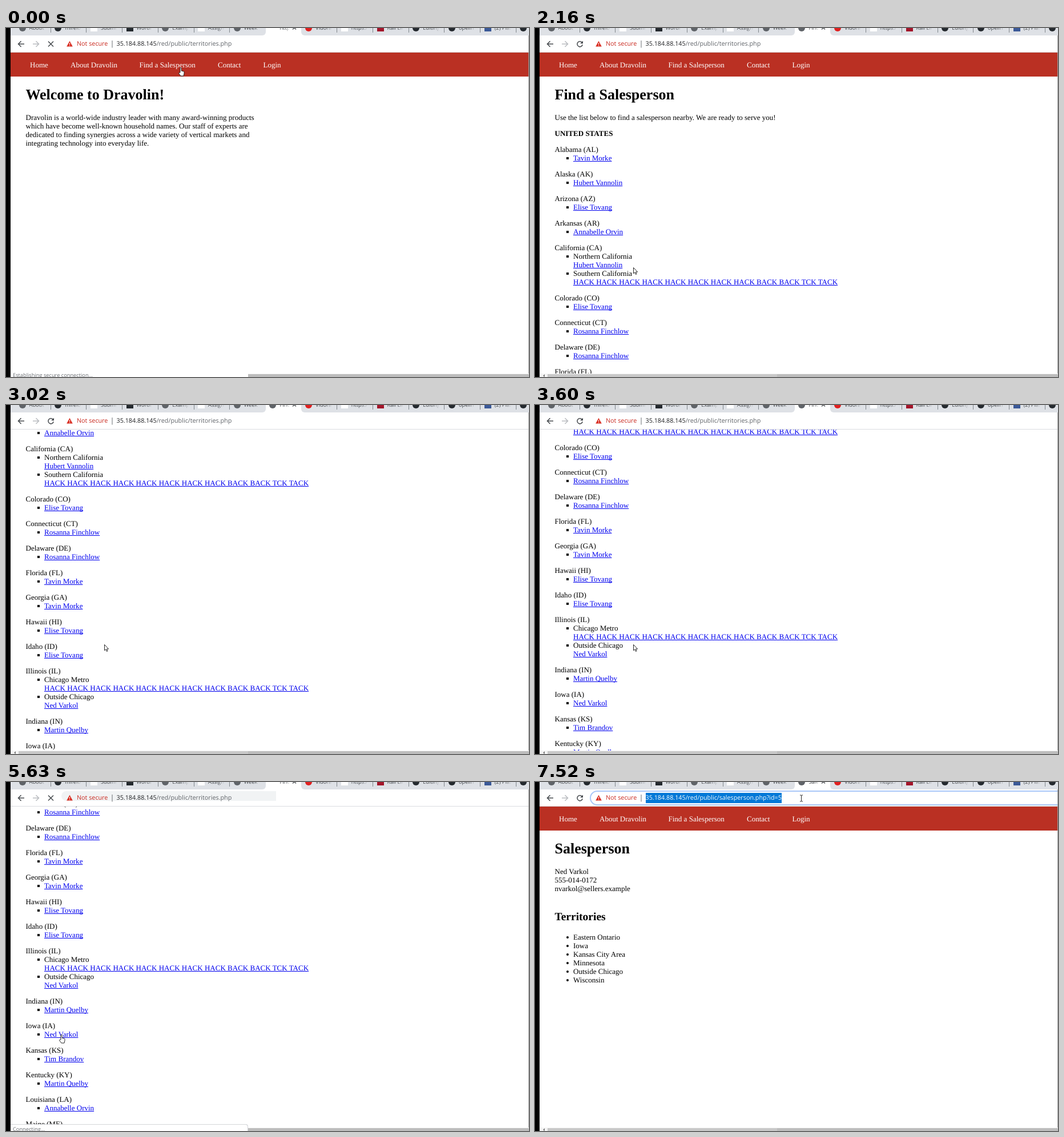
These frames come from a looping animation (916 px wide and 611 px high, 8000 ms). An HTML page:

```html
<!DOCTYPE html>
<html lang="en">
<head>
<meta charset="utf-8">
<title>Territories</title>
<style>
html, body { margin: 0; width: 100%; height: 100%; overflow: hidden; background: #fff; }
#stage { position: absolute; inset: 0; overflow: hidden; text-rendering: geometricPrecision; white-space: nowrap;
  font: 10.78px/16px "Open Sans", "Noto Sans", sans-serif; }
#stage div, #stage svg { position: absolute; }
#edge { left: 0; top: 0; width: 8px; height: 611px; background: #000; }
.strip { top: 0; height: 13px; background: #dee1e6; }
.tab { top: -7px; width: 29px; overflow: hidden; font-size: 9.3px; line-height: 14px; color: #45494d;
  -webkit-mask: linear-gradient(90deg, #000 60%, transparent); mask: linear-gradient(90deg, #000 60%, transparent); }
.icon { top: -6px; width: 12px; height: 12px; }
.sep { top: 0; width: 1px; height: 8px; background: #80868b; }
#hover { background: #f1f3f4; }
#ring { left: 96px; top: 15px; width: 840px; height: 22px; border: 2px solid #a9c7f8; border-radius: 13px; }
#url { left: 193.5px; top: 20px; color: #5f6368; }
#url b { font-weight: 400; color: #202124; }
#url.selected { background: #0078d7; box-shadow: 0 -1px #0078d7, 0 1px #0078d7; }
#url.selected, #url.selected b { color: #fff; }
#view { left: 8px; top: 43px; width: 907px; height: 562px; overflow: hidden; background: #fff;
  font: 13.03px/15px "Liberation Serif", "Times New Roman", serif; color: #000; }
.page { left: -8px; top: -43px; }
.page > div { left: 34.5px; }
.page > .nav { left: 8px; top: 43px; width: 907px; height: 41.5px; background: #ba3023; color: #fff; }
.nav div { top: 14px; }
.page h1, .page h2, .page p, .page ul { margin: 0; padding: 0; }
.page h1 { font-size: 26px; line-height: 29px; }
.page h2 { font-size: 19.5px; line-height: 22px; }
li { position: relative; list-style: none; margin-left: 32.5px; }
li::before { content: ""; position: absolute; left: -12px; top: 6px; width: 4px; height: 4px; background: #000; }
.disc li::before { border-radius: 50%; }
.page ul { margin-bottom: 13px; }
u { color: #00e; text-decoration-thickness: 1px; text-underline-offset: 1px; text-decoration-skip-ink: none; }
#toolbarLine { left: 8px; top: 42px; width: 907px; height: 1px; background: #dadce0; }
#bar { left: 22px; top: 606px; width: 894px; height: 5px; background: linear-gradient(90deg, #c8c8c8 402px, #bdbdbd 0); }
#bubble { left: 8px; top: 599px; height: 14px; padding: 1px 0 0 4px; box-sizing: border-box; background: #fff;
  border-radius: 0 4px 0 0; font-size: 9.25px; line-height: 16px; color: #6b6f74; }
#bubble.edged { box-shadow: inset -1px 1px #d4d6d9; }
</style>
</head>
<body>
<div id="stage">
  <div id="view">
    <div class="page" id="home">
      <div style="top:102px"><h1>Welcome to Dravolin!</h1></div>
      <div style="top:149px">Dravolin is a world-wide industry leader with many award-winning products<br>
        which have become well-known household names. Our staff of experts are<br>
        dedicated to finding synergies across a wide variety of vertical markets and<br>
        integrating technology into everyday life.</div>
    </div>
    <div class="page" id="list">
      <div style="top:102px"><h1>Find a Salesperson</h1></div>
      <div style="top:149px">Use the list below to find a salesperson nearby. We are ready to serve you!</div>
      <div style="top:177px"><b>UNITED STATES</b></div>
      <div style="top:205px" id="states"></div>
    </div>
    <div class="page" id="person">
      <div style="top:102px"><h1>Salesperson</h1></div>
      <div style="top:149px">Ned Varkol<br>555-014-0172<br>nvarkol@sellers.example</div>
      <div style="top:226px"><h2>Territories</h2></div>
      <div style="top:264px"><ul class="disc"><li>Eastern Ontario<li>Iowa<li>Kansas City Area<li>Minnesota<li>Outside Chicago<li>Wisconsin</ul></div>
    </div>
  </div>
  <div id="edge"></div>
  <div class="strip" style="left:8px;width:447px;border-radius:0 0 6px 0"></div>
  <div class="strip" style="left:517px;width:399px;border-radius:0 0 0 6px"></div>
  <div id="tabs"></div>
  <div id="toolbarLine"></div>
  <div id="hover"></div>
  <div id="ring"></div>
  <svg width="916" height="43" fill="none" stroke="#45494d" stroke-width="1.5">
    <path d="M32 28H21.5M26.5 23L21.5 28L26.5 33"/>
    <path d="M47 28H57.5M52.5 23L57.5 28L52.5 33" stroke="#b9bcc0"/>
    <path id="stop" d="M74 23.5L83 32.5M83 23.5L74 32.5"/>
    <g id="reload"><path d="M82.3 25.2A4.7 4.7 0 1 0 83.2 29.3"/><path d="M84 22.5V27.3H79.2Z" fill="#45494d" stroke="none"/></g>
    <path d="M502 -3.5L508 2.5M508 -3.5L502 2.5" stroke-width="1.2"/>
    <path d="M111.5 22.8L116.8 32.5H106.2Z" fill="#d93025" stroke="none"/>
    <path d="M111.5 26V29.2M111.5 30.2V31.4" stroke="#fff" stroke-width="1"/>
    <path d="M186 22V34.5" stroke="#6a6e73" stroke-width="1"/>
  </svg>
  <div style="left:124px;top:20px;color:#c9291f">Not secure</div>
  <div id="url"></div>
  <div style="left:915px;top:13px;width:1px;height:592px;background:#9a9a9a"></div>
  <div style="left:8px;top:605px;width:908px;height:6px;background:#f4f4f4"></div>
  <div id="bar"></div>
  <svg style="left:13px;top:606px" width="6" height="5"><path d="M1 3L4 0V5Z" fill="#777"/></svg>
  <div id="bubble"></div>
  <svg id="cursor" width="14" height="18" overflow="visible" fill="#fff" stroke="#111" stroke-width=".9" stroke-linejoin="round"><path/></svg>
</div>
<script>
const $ = id => document.getElementById(id);
const show = (el, on) => { el.style.display = on ? '' : 'none'; };
const latest = (track, t) => track.findLast(step => step[0] <= t);

// Static content
const people = {
  T: 'Tavin Morke', H: 'Hubert Vannolin', E: 'Elise Tovang', A: 'Annabelle Orvin', R: 'Rosanna Finchlow',
  N: 'Ned Varkol', M: 'Martin Quelby', B: 'Tim Brandov',
  X: 'HACK '.repeat(8) + 'BACK BACK TCK TACK'
};
const states = `Alabama (AL):T;Alaska (AK):H;Arizona (AZ):E;Arkansas (AR):A
California (CA):Northern California=H,Southern California=X
Colorado (CO):E;Connecticut (CT):R;Delaware (DE):R;Florida (FL):T;Georgia (GA):T;Hawaii (HI):E;Idaho (ID):E
Illinois (IL):Chicago Metro=X,Outside Chicago=N
Indiana (IN):M;Iowa (IA):N;Kansas (KS):B;Kentucky (KY):M;Louisiana (LA):A;Maine (ME):R`;
$('states').innerHTML = states.split(/[;\n]/).map(row => {
  const [state, areas] = row.split(':');
  const items = areas.split(',').map(area => {
    const [key, place] = area.split('=').reverse();
    return `<li>${place ? place + '<br>' : ''}<u>${people[key]}</u></li>`;
  });
  return `<p>${state}</p><ul>${items.join('')}</ul>`;
}).join('');

const navItems = { Home: 42, 'About Dravolin': 113, 'Find a Salesperson': 233.5, Contact: 371, Login: 450.5 };
const nav = Object.entries(navItems).map(([label, x]) => `<div style="left:${x - 8}px">${label}</div>`).join('');
document.querySelectorAll('.page').forEach(page =>
  page.insertAdjacentHTML('afterbegin', `<div class="nav">${nav}</div>`));

const gray = '#5f6368', dark = '#24292e', white = '#fff';
const tabs = [['About', gray], ['mirelo', dark], ['Submis', white, 1], ['Wordl', dark, 1], ['Examp', gray], ['Assign', white, 1],
  ['Week', gray], ['', gray], ['Vidora', '#e02020'], ['https:/', white, 1], ['Kali Lin', '#a3152a', 1], ['Editing', dark],
  ['opelin', dark], ['(2) Plaza', '#3b5998', 1], ['', dark]];
$('tabs').innerHTML = tabs.map(([title, color, square], i) => {
  const x = 15.5 + i * 62.7;
  const sep = i && i !== 7 && i !== 8 ? `<div class="sep" style="left:${x - 0.5}px"></div>` : '';
  return `${sep}<div class="icon" style="left:${x + 7}px;background:${color};border-radius:${square ? 0 : '50%'}"></div>
    <div class="tab" style="left:${x + 25}px">${title}</div>`;
}).join('');
const activeIcon = document.querySelectorAll('.icon')[7];
const activeTitle = document.querySelectorAll('.tab')[7];
activeTitle.style.width = '18px';

// Timeline
const shapes = {
  hand: 'M3 9V1.5a1.1 1.1 0 0 1 2.2 0V6l3.5.8q1.3.4 1.3 1.7v2L9 15H4L.7 10.6q-.5-1.2.7-1.4z',
  arrow: 'M.5.5V10.8L2.8 8.7L4.4 12.4L6 11.7L4.5 8.1H7.6Z',
  beam: 'M-2.5 -5.5H-.5L0 -5L.5 -5.5H2.5M0 -5V5M-2.5 5.5H-.5L0 5L.5 5.5H2.5'
};
const cursorTrack = [[0, 'hand', 302, 69],
  [1450, 'arrow', 262, 96], [1590, 'arrow', 186, 170], [1730, 'arrow', 112, 262], [1870, 'arrow', 78, 340],
  [2020, 'arrow', 126, 406], [2160, 'arrow', 172, 419],
  [4180, 'arrow', 138, 450], [4340, 'hand', 94, 448], [4640, 'hand', 94, 439], [5200, 'hand', 93, 442],
  [6350, 'arrow', 330, 180], [6480, 'beam', 527.5, 22.5], [6620, 'beam', 518, 24], [6780, 'beam', 500, 26],
  [6930, 'beam', 480, 28], [7080, 'beam', 466.5, 28.5]];
const scrollTrack = [[0, 0], [2590, 80], [2740, 239], [3020, 308], [3170, 319], [3310, 352], [3460, 390],
  [3600, 398], [3750, 450], [3900, 478]];
const link = 'https://35.184.88.145/red/public/salesperson.php?id=5';
const bubbleTrack = [[0, 'Establishing secure connection...', 1, 416], [430, 'Establishing secure connection...', 0.5, 416],
  [580, '', 0], [4640, link, 0.4], [4780, link, 0.7], [4920, link, 1],
  [5480, 'Connecting...', 1, 416], [6060, '', 0]];
const hoverTrack = [[0, 0, 0, 0], [5480, 97, 376, 17], [5780, 0, 0, 0], [6480, 205, 325, 22], [6620, 97, 818, 22], [7370, 0, 0, 0]];

function draw(t) {
  const page = t < 120 ? 'home' : t < 5780 ? 'list' : 'person';
  for (const id of ['home', 'list', 'person']) show($(id), id === page);
  $('list').style.top = -43 - latest(scrollTrack, t)[1] + 'px';

  const loading = t < 120 || (t >= 5480 && t < 5780);
  show($('stop'), loading);
  show($('reload'), !loading);
  show(activeIcon, !loading);
  activeTitle.textContent = { home: 'http', list: 'Find', person: 'Sale' }[page];
  const file = page === 'person' ? 'salesperson.php?id=5' : 'territories.php';
  $('url').innerHTML = `<b>35.184.88.145</b>/red/public/${file}`;
  $('url').className = t >= 7370 ? 'selected' : '';
  $('ring').style.opacity = t < 7370 ? 0 : t < 7520 ? 0.5 : 1;

  const [, hx, hw, hh] = latest(hoverTrack, t);
  $('hover').style.cssText = `left:${hx}px;top:16px;width:${hw}px;height:${hh}px;border-radius:${hx === 97 ? '9px 0 0 9px' : 0}`;

  const [, text, opacity, width] = latest(bubbleTrack, t);
  const bubble = $('bubble');
  bubble.textContent = text;
  bubble.style.opacity = opacity;
  bubble.style.width = width ? width + 'px' : 'auto';
  bubble.className = t >= 4640 && t < 5780 ? 'edged' : '';

  const [, shape, x, y] = latest(cursorTrack, t);
  $('cursor').style.transform = `translate(${x}px, ${y}px)`;
  $('cursor').firstElementChild.setAttribute('d', shapes[shape]);
}

function tick() {
  draw(performance.now() % 8000);
  requestAnimationFrame(tick);
}
tick();
</script>
</body>
</html>
```
